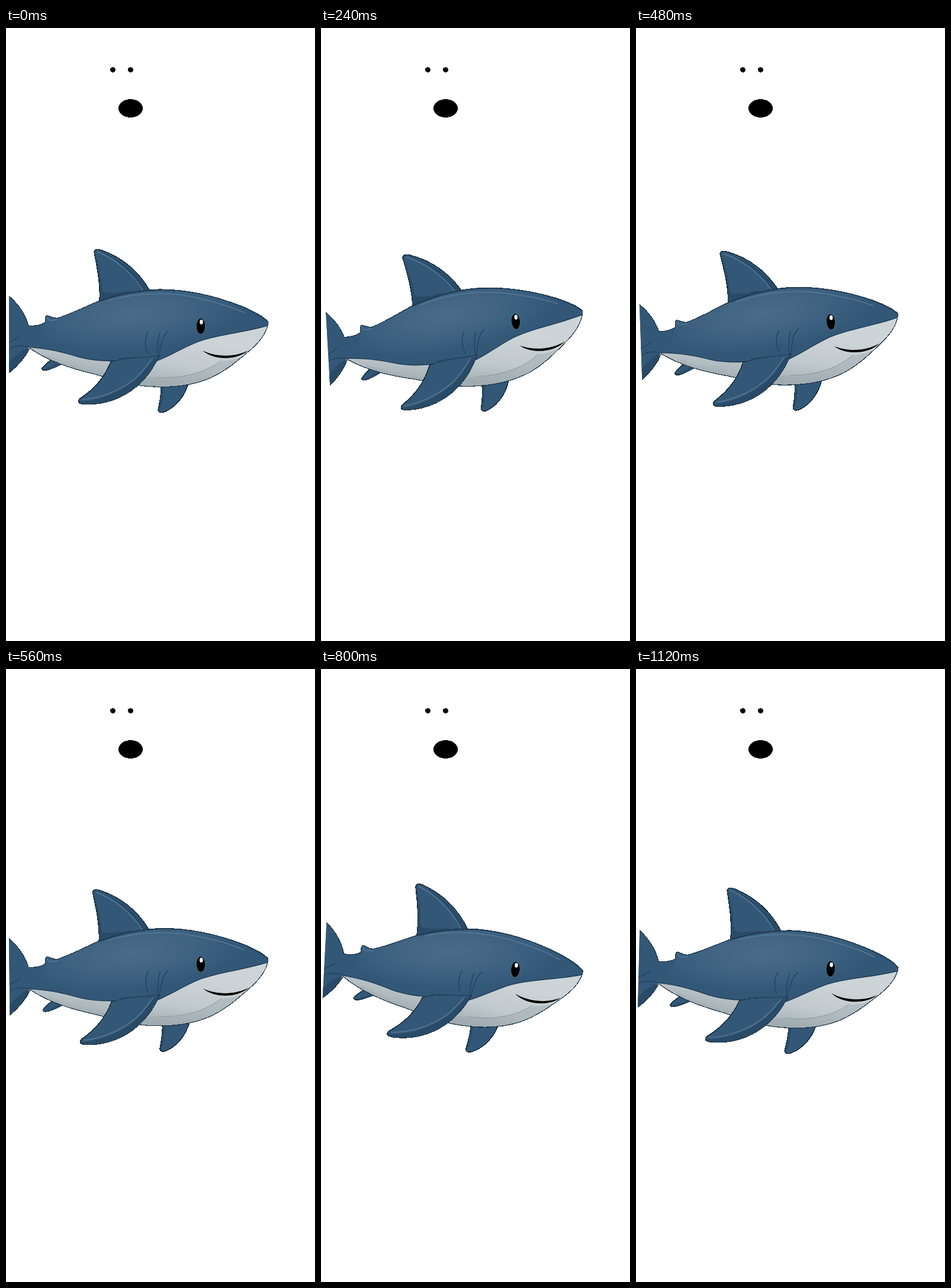
Animation of 522x1034 px, one loop 1.2 s. Source, as an HTML page:

```html
<!DOCTYPE html>
<html lang="en">
<head>
<meta charset="utf-8">
<title>Swimming shark</title>
<style>
  html, body { margin: 0; width: 100%; height: 100%; overflow: hidden; background: #fff; }
  svg { display: block; width: 100%; height: 100%; }
  .skin { fill: #335877; stroke: #14283a; stroke-width: 1.5; stroke-linejoin: round; shape-rendering: crispEdges; }
  .shade { fill: #294b67; }
  .line { fill: none; stroke: #234561; stroke-width: 1.6; stroke-linecap: round; }
  .shine { fill: none; stroke: #587996; stroke-width: 1.5; stroke-linecap: round; }
</style>
</head>
<body>
<svg viewBox="0 0 522 1034" preserveAspectRatio="xMinYMin meet">
  <defs>
    <radialGradient id="back" gradientUnits="userSpaceOnUse" cx="0" cy="0" r="1"
      gradientTransform="translate(215 482) rotate(-5) scale(185 62)">
      <stop offset="0" stop-color="#4a6c8a"/>
      <stop offset=".45" stop-color="#426584"/>
      <stop offset="1" stop-color="#335877"/>
    </radialGradient>
    <linearGradient id="belly" gradientUnits="userSpaceOnUse" x1="300" y1="520" x2="285" y2="606">
      <stop offset="0" stop-color="#cdd4d7"/>
      <stop offset=".6" stop-color="#c0c9cd"/>
      <stop offset="1" stop-color="#a6b1b6"/>
    </linearGradient>
    <clipPath id="edge"><path id="edgeShape" d="M0-500H600V600H0Z"/></clipPath>
    <clipPath id="inside"><use href="#body"/></clipPath>
    <path id="body" d="M443 496C437 488 423 480 400 470C352 451 305 441 260 441C222 442 190 449 158 460
      C132 471 108 483 88 489C80 491 74 485 69 485C65 486 67 492 66 497C57 502 48 503 38 502
      C33 484 21 466 5 452L-16 436V606L5 582C20 570 33 555 40 540C72 562 108 574 150 584
      C182 593 213 604 250 605C287 607 318 602 346 590C374 577 391 561 407 548C424 534 441 517 443 496Z"/>
    <path id="seam" d="M38 539C72 541 98 548 124 556C147 562 171 563 195 562L247 565
      C272 557 296 541 324 530C357 518 405 514 445 502"/>
  </defs>

  <g shape-rendering="crispEdges">
    <circle cx="180.5" cy="70.5" r="4.5"/>
    <circle cx="210.5" cy="70.5" r="4.5"/>
    <ellipse cx="210.5" cy="135.5" rx="20.5" ry="15.5"/>
  </g>

  <g clip-path="url(#edge)">
    <g id="shark">
      <!-- far fins -->
      <path class="skin" d="M82 556C73 562 65 568 61 574C60 578 67 578 73 576C82 573 89 569 97 566Z"/>
      <path class="shade" d="M63 576C74 573 84 568 91 564L95 567C84 573 73 578 63 576Z"/>
      <path class="skin" d="M262 602C263 619 259 633 257 644C258 649 262 650 269 647C289 638 302 620 308 600Z"/>
      <path class="shade" d="M258 645C266 636 264 618 267 604H262C262 621 259 632 258 645Z"/>

      <!-- dorsal fin -->
      <path class="skin" d="M158 461C160 434 154 403 149 378C150 372 156 373 162 375C198 388 225 412 243 443Z"/>
      <path class="shade" d="M159 376C199 392 224 416 242 443L231 444C215 416 190 391 159 376Z"/>
      <path class="shade" d="M152 381C159 404 162 428 163 443C166 449 190 446 214 443L204 448L158 460C160 431 157 406 152 381Z"/>
      <path class="shine" d="M155 378C188 391 214 415 231 442" stroke-width="1"/>

      <!-- body -->
      <use href="#body" fill="url(#back)"/>
      <g clip-path="url(#inside)">
        <path d="M-16 436L5 452C21 466 33 484 38 502Q52 506 66 498L60 517L39 540L-16 606Z" fill="#335877"/>
        <path class="shade" d="M-16 604L5 565C16 552 27 543 41 538C34 556 20 572 5 583Z"/>
        <path class="line" d="M6 541C16 535 27 535 39 538M5 530C12 527 19 524 24 519" stroke-width="1"/>
        <use href="#seam" fill="none" stroke="#213f59" stroke-width="3"/>
        <path fill="url(#belly)" d="M38 539C72 541 98 548 124 556C147 562 171 563 195 562L247 565
          C272 557 296 541 324 530C357 518 405 514 445 502L450 620H180L35 560Z"/>
        <path d="M243 589C290 592 337 582 363 562C376 561 391 559 401 553L346 598L250 612L204 604Z"
          fill="#95a2a8" opacity=".4"/>
        <path d="M255 589C297 593 338 581 363 561" fill="none" stroke="#8e9ba1" stroke-width="1"/>
        <path d="M70 555C113 575 160 586 208 600" fill="none" stroke="#a5b0b5" stroke-width="7" opacity=".65"/>
        <path class="line" d="M443 496C423 479 352 441 260 442C222 443 190 450 158 461" stroke-width="5"/>
        <path class="shine" d="M172 460C226 444 286 445 334 458C357 463 382 471 402 480"/>
        <path class="shine" d="M70 488C70 494 76 494 87 492" stroke-width="1"/>
      </g>
      <use href="#body" fill="none" stroke="#1d344a" stroke-width="1.2" shape-rendering="crispEdges"/>
      <path class="line" d="M240 513C233 526 235 538 239 548M260 515C255 526 257 538 255 550M274 512C259 524 264 540 256 555"/>

      <!-- near fin -->
      <path class="skin" d="M177 563C168 586 151 608 125 625C120 631 123 634 133 634.5C167 636 198 624 220 605
        C239 589 248 574 259 553C240 557 209 555 177 563Z"/>
      <path class="shade" d="M124 630C160 630 198 611 219 593C234 580 242 565 251 555L259 553
        C248 574 239 589 220 605C198 624 167 636 133 634.5Q125 635 124 630Z"/>
      <path class="shine" d="M129 627C164 624 196 609 217 592C231 580 240 567 248 557" stroke-width="1"/>
      <path d="M178 563C207 555 236 557 257 552L252 557C232 561 205 559 178 565Z" fill="#335877"/>
      <path class="line" d="M191 558C213 554 235 557 256 553"/>

      <!-- face -->
      <ellipse cx="329" cy="503" rx="7.7" ry="13.5" stroke="#4c6f8b" stroke-width="1"/>
      <ellipse cx="330" cy="496" rx="2.8" ry="4" fill="#fff"/>
      <path d="M332 544C354 555 386 556 409 544C390 561 351 561 332 544Z"/>
    </g>
  </g>
</svg>
<script>
  const LOOP = 1200, STEP = 80, SWING = 5.7, BOB = 1.7;
  const shark = document.getElementById('shark');
  const edge = document.getElementById('edgeShape');

  function pose(time) {
    const phase = Math.floor(time % LOOP / STEP) * STEP / LOOP * 2 * Math.PI;
    const angle = -SWING * Math.sin(phase);
    const rise = BOB * (Math.cos(phase) - 1);
    shark.setAttribute('transform', `translate(0 ${rise}) rotate(${angle} 256 500)`);
    // The cut through the tail tilts less than the body.
    edge.setAttribute('transform', `translate(${5 + 0.09 * angle * angle} 470) rotate(${0.6 * angle})`);
  }

  const start = performance.now();
  function tick() {
    pose(performance.now() - start);
    requestAnimationFrame(tick);
  }
  pose(0);
  requestAnimationFrame(tick);
</script>
</body>
</html>
```
